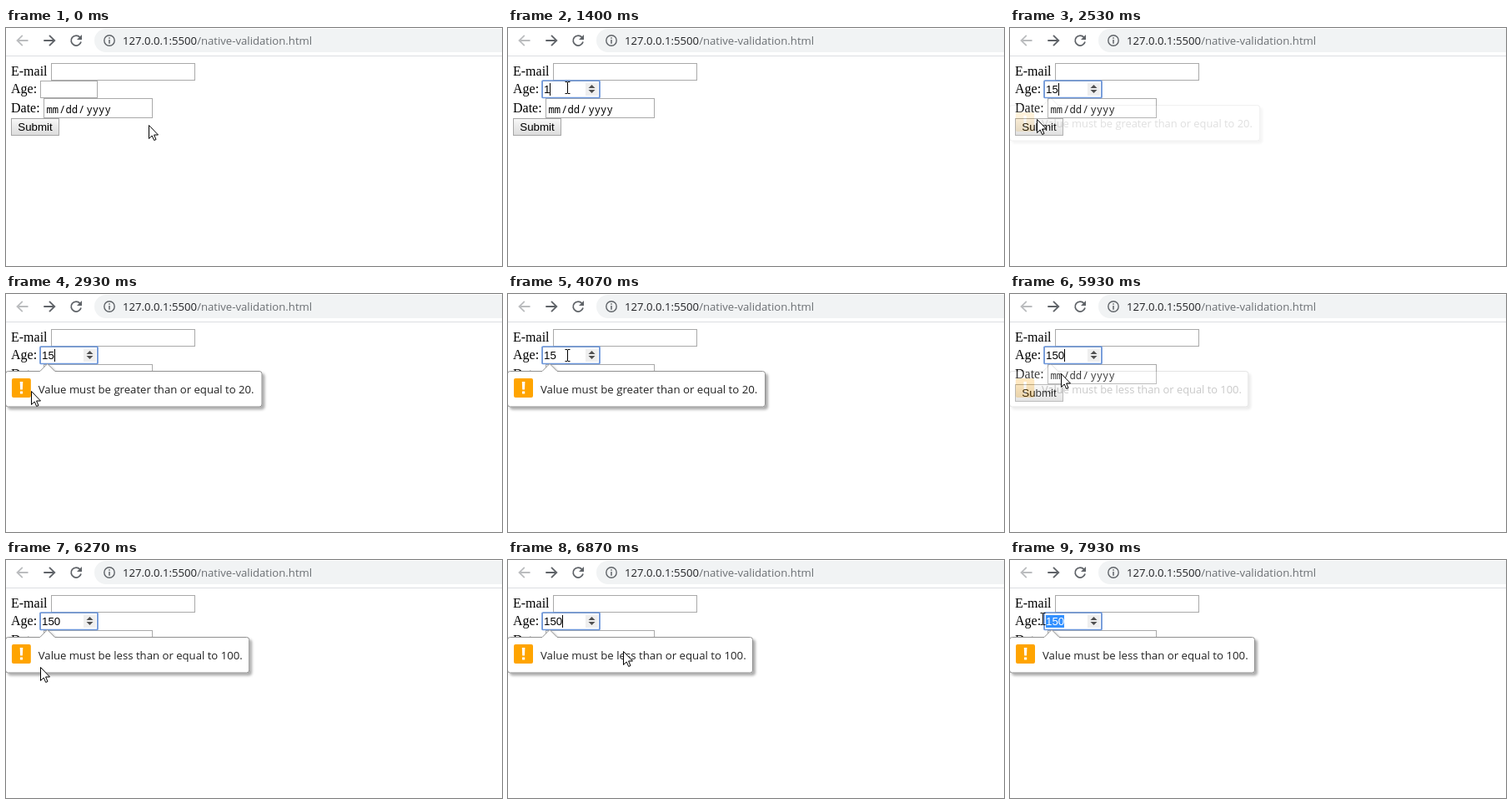
Animation, 595 px wide and 285 px high, one loop 8 s. Source, as an HTML page:

```html
<!DOCTYPE html>
<html lang="en">
<head>
<meta charset="utf-8">
<title>Native validation</title>
<style>
  html, body { margin: 0; width: 100%; height: 100%; overflow: hidden; background: #fff; }
  svg { display: block; width: 595px; height: 285px; }
  text { white-space: pre; }
  .url { font: 13.15px "Open Sans", "Noto Sans", sans-serif; }
  .page { font: 16px "Liberation Serif", serif; }
  .ui { font: 13.333px "Liberation Sans", sans-serif; }
  .date { font: 12.2px "Noto Sans Mono", monospace; }
  .tip { font: 13.24px "Open Sans", "Noto Sans", sans-serif; fill: #222; }
  .field { fill: #fff; stroke: #a9a9a9; }
  .icon { fill: none; stroke: #5f6368; stroke-width: 1.8; }
</style>
</head>
<body>
<svg viewBox="0 0 595 285">
  <defs>
    <linearGradient id="face" x2="0" y2="1">
      <stop stop-color="#f8f8f8"/><stop offset="1" stop-color="#dcdcdc"/>
    </linearGradient>
    <filter id="shadow" x="-5%" y="-20%" width="110%" height="150%">
      <feDropShadow dx="3" dy="3" stdDeviation="1.7" flood-opacity=".32"/>
    </filter>
    <clipPath id="selClip"><rect id="selArea" y="66" height="15"/></clipPath>
  </defs>

  <!-- toolbar -->
  <rect x="106" y="1" width="520" height="28" rx="14" fill="#f1f3f4"/>
  <path d="M0 33.5H595" stroke="#dcdee1"/>
  <path class="icon" d="M26.5 15H13.5M19.8 8.8L13.5 15L19.8 21.2" style="stroke:#bbbdbf"/>
  <path class="icon" d="M45.3 15H58.3M52 8.8L58.3 15L52 21.2"/>
  <path class="icon" d="M88.8 11.2A6 6 0 1 0 90 16.5"/>
  <path d="M91 8V14H85Z" fill="#5f6368"/>
  <circle class="icon" cx="124" cy="15" r="6.2" style="stroke-width:1.4"/>
  <path class="icon" d="M124 11.2V12.8M124 14V18.8" style="stroke-width:1.5"/>
  <text class="url" x="140" y="20" fill="#202124">127.0.0.1:5500<tspan fill="#6b6f73">/native-validation.html</tspan></text>

  <!-- form -->
  <g class="page">
    <text x="6" y="57">E-mail</text>
    <text x="6" y="78">Age:</text>
    <text x="6" y="101">Date:</text>
  </g>
  <rect class="field" x="54.5" y="42.5" width="172" height="20"/>
  <rect class="field" x="41.5" y="63.5" width="68" height="20"/>
  <rect class="field" x="45.5" y="84.5" width="130" height="23"/>
  <text class="date" y="101.5"><tspan x="48.5">mm</tspan><tspan x="64">/</tspan><tspan x="71.5">dd</tspan><tspan x="87">/</tspan><tspan x="96.5">yyyy</tspan></text>
  <rect x="6.5" y="108.5" width="57" height="20" fill="url(#face)" stroke="#a6a6a6"/>
  <text class="ui" x="35" y="123" text-anchor="middle">Submit</text>

  <g id="focus">
    <rect x="41" y="63" width="69" height="20.5" rx="1" fill="none" stroke="#6b96dc" stroke-width="1.7"/>
    <rect x="93" y="66" width="15" height="15" fill="#efefef"/>
    <path d="M96.5 72L100.5 68L104.5 72ZM96.5 74L100.5 78L104.5 74Z" fill="#505050"/>
  </g>
  <text class="ui age" x="43" y="78"></text>
  <g clip-path="url(#selClip)">
    <rect x="43" y="66" width="30" height="15" fill="#3390ff"/>
    <text class="ui age" x="43" y="78" fill="#fff"></text>
  </g>
  <rect id="caret" y="66" width="1" height="15"/>

  <!-- validation bubble -->
  <g id="bubble">
    <path id="box" fill="#fff" stroke="#8f8f8f" filter="url(#shadow)"/>
    <rect x="7" y="101" width="23" height="23" rx="2" fill="#ffa400"/>
    <path d="M16.8 105H20.4L20 114.6H17.2ZM17 116.6H20.2V119.6H17Z" fill="#fff"/>
    <text id="message" class="tip" x="39" y="119"></text>
  </g>

  <!-- pointer -->
  <path id="arrow" d="M.5 .5V16.5L4.2 13L6.7 18.5L9 17.5L6.6 12H11.5Z" fill="#fff" stroke="#000"/>
  <path id="beam" d="M-3.5 -6.5H-1L-.5 -6L0 -6.5H2.5M-.5 -6V7M-3.5 7.5H-1L-.5 7L0 7.5H2.5" fill="none" stroke="#000"/>
</svg>
<script>
const LOOP = 8000, BLINK = 530, DIGIT = 7.42, LEFT = 43;
const $ = id => document.getElementById(id);
const show = (el, on) => { el.style.display = on ? "" : "none"; };
const clamp = v => Math.min(1, Math.max(0, v));
const smooth = v => v * v * (3 - 2 * v);
const last = (list, t) => list.filter(item => item[0] <= t).pop();

// time, x, y
const path = [
  [0, 171, 116], [70, 171, 116], [560, 68, 72], [800, 72, 71], [2000, 72, 71],
  [2330, 36, 126], [2460, 32, 109], [2560, 32, 109], [2900, 30, 116], [2950, 30, 116],
  [3600, 230, 116], [3670, 230, 116], [4070, 72, 73], [4870, 72, 73], [5130, 72, 76],
  [5700, 72, 76], [6270, 41, 128], [6530, 80, 154], [6870, 138, 109], [7300, 138, 109],
  [7400, 138, 84], [7630, 138, 84], [7750, 70, 72], [7930, 40, 70], [LOOP, 40, 70]
];
const typed = [[0, ""], [1400, "1"], [1600, "15"], [5730, "150"]];
const caretOn = [[600], [1400], [1600], [2460], [5000], [5740]];
const bubbles = [
  { from: 2450, to: 5730, right: 308.5, text: "Value must be greater than or equal to 20." },
  { from: 5820, to: LOOP, right: 293.5, text: "Value must be less than or equal to 100." }
];

function pointerAt(t) {
  const i = path.findIndex(p => p[0] > t);
  const [t0, x0, y0] = path[i - 1], [t1, x1, y1] = path[i];
  const k = smooth((t - t0) / (t1 - t0));
  return [x0 + (x1 - x0) * k, y0 + (y1 - y0) * k];
}

function selectionStart(t, x, end) {
  if (t >= 4470 && t < 5000) return LEFT;
  if (t < 7750) return end;
  return Math.min(end, LEFT + Math.max(0, Math.round((x - LEFT) / DIGIT)) * DIGIT);
}

function drawBubble(t) {
  const b = bubbles.find(b => t >= b.from && t < b.to);
  show($("bubble"), b);
  if (!b) return;
  const age = t - b.from;
  const scale = 1 - .035 * (1 - clamp(age / 680)) ** 1.6;
  $("bubble").setAttribute("transform", `scale(${scale} 1)`);
  $("bubble").setAttribute("opacity", smooth(clamp(age / 350)));
  $("box").setAttribute("d",
    `M2.5 92.5H41L50 83.5L59 92.5H${b.right - 3}q3 0 3 3V132q0 3 -3 3H2.5q-3 0 -3 -3V95.5q0 -3 3 -3Z`);
  $("message").textContent = b.text;
}

function draw(t) {
  const [x, y] = pointerAt(t);
  const value = last(typed, t)[1];
  const end = Math.round(LEFT + value.length * DIGIT);
  const start = selectionStart(t, x, end);
  const blink = last(caretOn, t);

  show($("focus"), t >= 600);
  document.querySelectorAll(".age").forEach(el => { el.textContent = value; });
  $("selArea").setAttribute("x", start);
  $("selArea").setAttribute("width", end - start);
  $("caret").setAttribute("x", end);
  show($("caret"), blink && start === end && Math.floor((t - blink[0]) / BLINK) % 2 === 0);
  drawBubble(t);

  const inField = x >= 39 && x <= 110 && y >= 62 && y < 84;
  show($("beam"), inField);
  show($("arrow"), !inField);
  $(inField ? "beam" : "arrow").setAttribute("transform", `translate(${Math.round(x)} ${Math.round(y)})`);
}

const began = performance.now();
function tick() {
  draw((performance.now() - began) % LOOP);
  requestAnimationFrame(tick);
}
tick();
</script>
</body>
</html>
```
